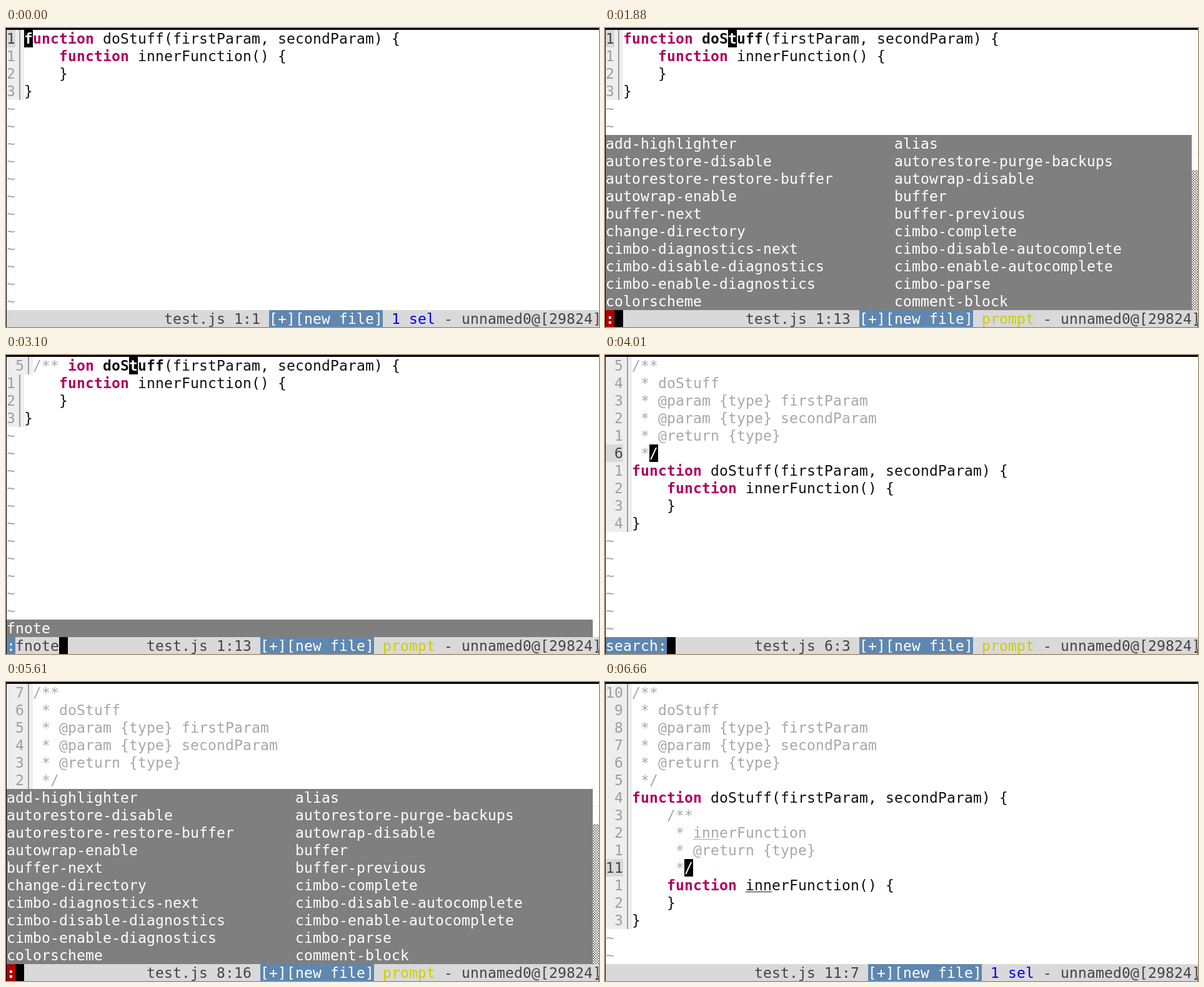
An HTML page with a canvas that plays this animation: 949x478 px, repeating every 9760 ms.

```html
<!DOCTYPE html>
<html lang="en">
<head>
<meta charset="utf-8">
<title>Editor session</title>
<style>
html, body { margin: 0; width: 100%; height: 100%; overflow: hidden; background: #fff; }
canvas { display: block; }
</style>
</head>
<body>
<canvas id="stage" width="949" height="478"></canvas>
<script>
const ctx = document.getElementById('stage').getContext('2d');
const LOOP = 9760;
const CW = 14, CH = 28, LEFT = 1, TOP = 3, COLS = 68, STATUS = 16;
const FONT = '23px "DejaVu Sans Mono", monospace';

const INK = '#111', DIM = '#a8a8a8', KEY = '#af005f', GUTTER = '#eeeeee', LINE_NO = '#9e9e9e';
const BAR = '#d9d9d9', BAR_INK = '#444', BLUE = '#5f87af', RED = '#af0000';
const MENU = '#7f7f7f', PICK = '#afffaf';

const code = [
  'function doStuff(firstParam, secondParam) {',
  '    function innerFunction() {',
  '    }',
  '}'
];
const outerDoc = [
  '/**', ' * doStuff', ' * @param {type} firstParam',
  ' * @param {type} secondParam', ' * @return {type}', ' */'
];
const innerDoc = ['    /**', '     * innerFunction', '     * @return {type}', '     */'];
const withOuter = [...outerDoc, ...code];
const withBoth = [...outerDoc, code[0], ...innerDoc, ...code.slice(1)];

const COMMAND = 'fnote';
const allCommands = [
  'add-highlighter', 'alias',
  'autorestore-disable', 'autorestore-purge-backups',
  'autorestore-restore-buffer', 'autowrap-disable',
  'autowrap-enable', 'buffer',
  'buffer-next', 'buffer-previous',
  'change-directory', 'cimbo-complete',
  'cimbo-diagnostics-next', 'cimbo-disable-autocomplete',
  'cimbo-disable-diagnostics', 'cimbo-enable-autocomplete',
  'cimbo-enable-diagnostics', 'cimbo-parse',
  'colorscheme', 'comment-block'
];

// Each step changes part of the editor state from its time on.
const steps = [];
const at = (time, change) => steps.push({ time, change });

function typeCommand(times) {
  times.forEach((time, i) => at(time, { typed: COMMAND.slice(0, i + 1) }));
}

at(0, {
  doc: code, line: 1, col: 1, sel: 1, word: '', find: '',
  label: '', typed: '', menu: null, pointer: false, torn: false
});
at(420, { pointer: true });
at(1020, { col: 2 });
[3, 5, 7, 9, 11].forEach((col, i) => at(1220 + i * 44, { col }));
at(1440, { col: 13, word: 'doStuff' });

at(1840, { label: ':' });
at(1880, { menu: allCommands });
typeCommand([2540, 2620, 2700, 2780, 2860]);
at(2580, { menu: [COMMAND] });
at(3100, { torn: true });
at(3140, { torn: false, doc: withOuter, line: 6, col: 3, word: '', label: '', typed: '', menu: null });

at(4010, { label: 'search:' });
at(4240, { typed: 'i' });
at(4280, { find: 'i', line: 7, col: 6 });
at(4380, { typed: 'in' });
at(4420, { find: 'in', line: 8, col: 15, sel: 2 });
at(4510, { typed: 'inn' });
at(4550, { find: 'inn', col: 16, sel: 3 });
at(4690, { label: '', typed: '' });
at(4730, { word: 'innerFunction' });

at(5570, { label: ':' });
at(5610, { menu: allCommands });
typeCommand([6020, 6100, 6140, 6180, 6220]);
at(6060, { menu: [COMMAND] });
at(6620, { doc: withBoth, line: 11, col: 7, sel: 1, word: '' });
at(6660, { label: '', typed: '', menu: null });
steps.sort((a, b) => a.time - b.time);

function stateAt(time) {
  const state = {};
  for (const s of steps) if (s.time <= time) Object.assign(state, s.change);
  return state;
}

const cellX = col => LEFT + col * CW;
const cellY = row => TOP + row * CH;

function box(x, y, w, h, color) {
  ctx.fillStyle = color;
  ctx.fillRect(x, y, w, h);
}

function cells(col, row, n, color) {
  box(cellX(col), cellY(row), n * CW, CH, color);
}

function text(str, col, row, color, bold) {
  ctx.font = (bold ? 'bold ' : '') + FONT;
  ctx.fillStyle = color;
  [...str].forEach((ch, i) => {
    if (ch !== ' ') ctx.fillText(ch, cellX(col + i), cellY(row) + 22);
  });
}

function mark(flags, str, word, whole) {
  if (!word) return;
  const re = new RegExp(whole ? '\\b' + word + '\\b' : word, 'g');
  for (const m of str.matchAll(re)) flags.fill(true, m.index, m.index + word.length);
}

function drawGutter(row, label, digits, current) {
  cells(0, row, digits + 1, GUTTER);
  if (current) cells(0, row, digits, BAR);
  text(String(label).padStart(digits), 0, row, current ? BAR_INK : LINE_NO);
  box(cellX(digits) + 6, cellY(row), 2, CH, LINE_NO);
}

function drawLine(str, row, s, start) {
  const flags = () => Array(str.length).fill(false);
  const key = flags(), bold = flags(), under = flags();
  const comment = /^\s*(\/\*\*|\*)/.test(str);
  mark(key, str, 'function', true);
  if (!comment) mark(bold, str, s.word, true);
  mark(under, str, s.find, false);
  const here = row + 1 === s.line;
  [...str].forEach((ch, i) => {
    const col = start + i;
    const cursor = here && i === s.col - 1;
    const picked = here && i < s.col - 1 && i >= s.col - s.sel;
    let color = comment ? DIM : key[i] ? KEY : INK;
    if (picked) cells(col, row, 1, PICK);
    if (cursor) {
      cells(col, row, 1, '#000');
      color = '#fff';
    }
    text(ch, col, row, color, key[i] || bold[i]);
    if (under[i]) box(cellX(col), cellY(row) + 24, CW, 1, color);
  });
}

function drawDoc(s) {
  const digits = String(s.doc.length).length;
  for (let row = 0; row < STATUS; row++) {
    if (row >= s.doc.length) {
      text('~', 0, row, DIM);
      continue;
    }
    const away = Math.abs(row + 1 - s.line);
    drawGutter(row, away || s.line, digits, !away);
    drawLine(s.doc[row], row, s, digits + 1);
  }
  if (s.torn) {
    cells(0, 0, 7, '#fff');
    drawGutter(0, 5, 2, false);
    text('/**', 3, 0, DIM);
  }
}

function drawMenu(items) {
  const full = items.length > 1;
  const rows = full ? items.length / 2 : 1;
  const top = STATUS - rows;
  cells(0, top, COLS - 1, MENU);
  box(LEFT, cellY(top), (COLS - 1) * CW, rows * CH, MENU);
  items.forEach((item, i) => text(item, i % 2 * 33, top + (i >> 1), '#fff'));

  const x = cellX(COLS - 1);
  box(x, cellY(top), CW, rows * CH, '#fff');
  if (!full) return;
  box(x, cellY(top) + CH - 1, CW, 1, '#f0f0f0');
  const y0 = cellY(top + 2), y1 = cellY(STATUS);
  box(x, y0, CW, y1 - y0, MENU);
  for (let y = y0; y < y1; y += 2) {
    for (let dx = (y - y0) % 4; dx < CW; dx += 4) box(x + dx, y, 2, 2, '#fff');
  }
}

function drawStatus(s) {
  cells(0, STATUS, COLS, BAR);
  const parts = [
    [`test.js ${s.line}:${s.col} `, BAR_INK],
    ['[+][new file]', '#fff', BLUE],
    s.label ? [' prompt', '#cdcd00'] : [' 1 sel', '#0000ee'],
    [' - unnamed0@[29824]', BAR_INK]
  ];
  let col = COLS - parts.reduce((n, p) => n + p[0].length, 0);
  for (const [str, color, back] of parts) {
    if (back) cells(col, STATUS, str.length, back);
    text(str, col, STATUS, color);
    col += str.length;
  }
  if (!s.label) return;
  const n = s.label.length;
  const unknown = s.label === ':' && s.typed !== COMMAND;
  cells(0, STATUS, n, unknown ? RED : BLUE);
  text(s.label, 0, STATUS, '#fff', unknown);
  text(s.typed, n, STATUS, BAR_INK);
  cells(n + s.typed.length, STATUS, 1, '#000');
}

function drawPointer() {
  box(945, 474, 2, 2, '#000');
  box(947, 470, 1, 8, '#fff');
  box(948, 470, 1, 8, '#000');
}

function draw(time) {
  const s = stateAt(time);
  box(0, 0, 949, 478, '#fff');
  drawDoc(s);
  if (s.menu) drawMenu(s.menu);
  drawStatus(s);
  box(0, 0, 949, 3, '#000');
  box(0, 0, 1, 478, '#000');
  if (s.pointer) drawPointer();
}

const began = performance.now();
function tick() {
  draw((performance.now() - began) % LOOP);
  requestAnimationFrame(tick);
}
draw(0);
requestAnimationFrame(tick);
</script>
</body>
</html>
```
